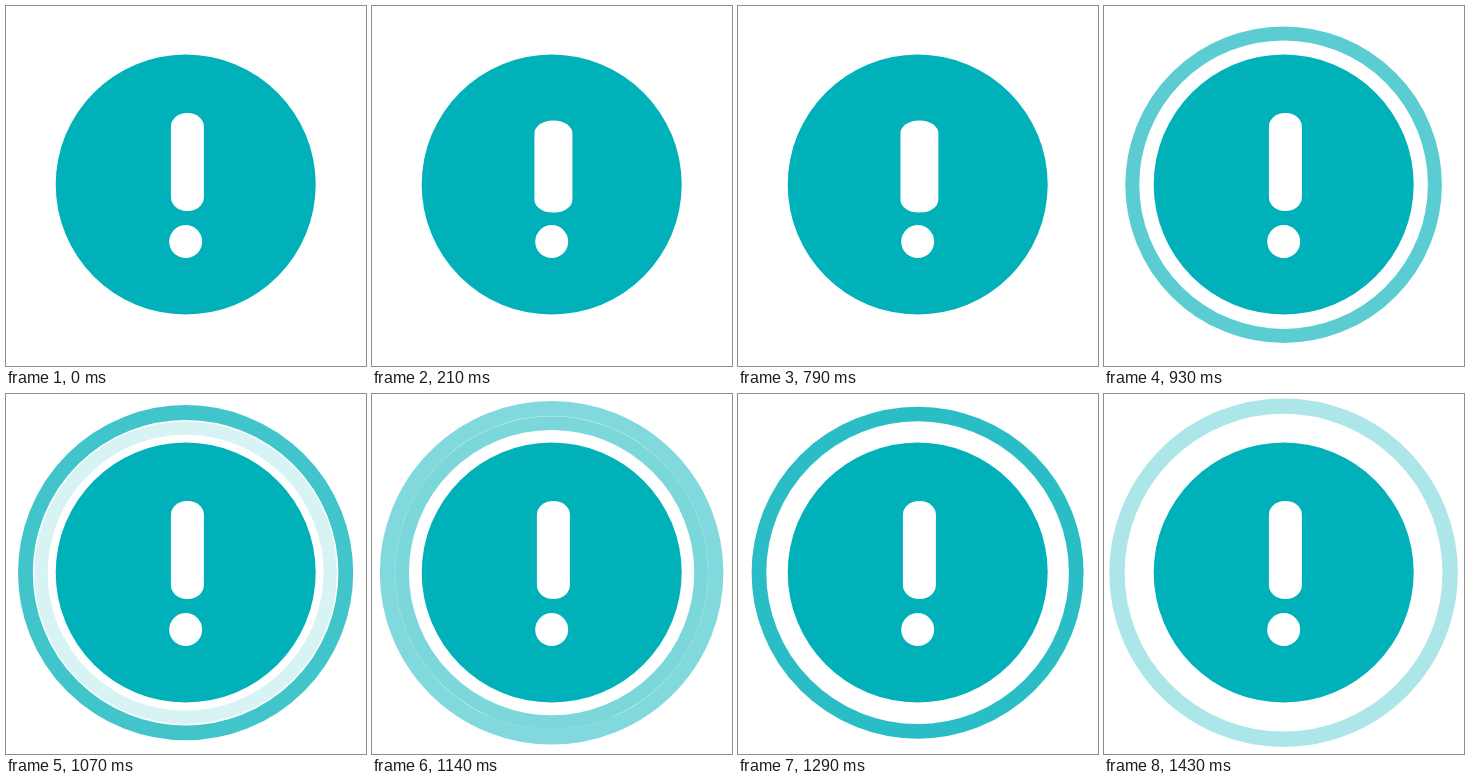
An HTML page that plays this animation: 360x360 px, repeating every 1500 ms.

```html
<!DOCTYPE html>
<html lang="en">
<head>
<meta charset="utf-8">
<title>Alert</title>
<style>
  html, body { margin: 0; width: 100%; height: 100%; overflow: hidden; background: #fff; }
  svg { display: block; width: 100%; height: 100%; }
  .ring { fill: none; stroke: #00b1ba; }
</style>
</head>
<body>
<svg viewBox="0 0 360 360">
  <circle class="ring" cx="179.6" cy="178.7" opacity="0"/>
  <circle class="ring" cx="179.6" cy="178.7" opacity="0"/>
  <circle cx="179.7" cy="178.6" r="130" fill="#00b1ba"/>
  <rect id="bar" x="-16.5" y="-49" width="33" height="98" rx="16" ry="14" fill="#fff"/>
  <circle cx="179.7" cy="235.6" r="16.5" fill="#fff"/>
</svg>
<script>
const LOOP = 1500, STEPS = 21, STEP = LOOP / STEPS;
const TOP = 7 * STEP;     // the bar is highest here, its motion mirrors around it
const FLIGHT = 4 * STEP;  // from the top down to the landing
const RING_START = 800, RING_DELAY = 240, RING_LIFE = 480, RING_RISE = 200;

const bar = document.getElementById('bar');
const rings = document.querySelectorAll('.ring');
const clamp = x => Math.max(0, Math.min(1, x));
const smooth = p => p * p * (3 - 2 * p);

function drawBar(t) {
  const u = Math.min(Math.abs(t - TOP), FLIGHT * 1.5);
  // full squash at the top and on landing, none in between and at rest
  const squash = Math.cos(Math.PI * u / FLIGHT) ** 2;
  const y = u < FLIGHT ? 113 + 47.5 * smooth(u / FLIGHT) : 156 + 4.5 * squash;
  bar.setAttribute('transform',
    `translate(181.4 ${y}) scale(${1 + 0.15 * squash} ${1 - 0.06 * squash})`);
}

function drawRing(ring, age) {
  const p = clamp(age / RING_LIFE);
  const r = 142.3 + 35.3 * p - 6.5 * p * p;
  ring.setAttribute('r', r);
  ring.setAttribute('stroke-width', r * 0.0925);
  ring.setAttribute('opacity',
    clamp(Math.min(age / RING_RISE, (RING_LIFE - age) / (RING_LIFE - RING_RISE))));
}

function draw(ms) {
  // the motion is held in equal steps
  const t = Math.min(STEPS - 1, Math.floor((ms % LOOP + 5) / STEP)) * STEP;
  drawBar(t);
  rings.forEach((ring, i) => drawRing(ring, t - RING_START - i * RING_DELAY));
}

const start = performance.now();
function tick() {
  draw(performance.now() - start);
  requestAnimationFrame(tick);
}
tick();
</script>
</body>
</html>
```
